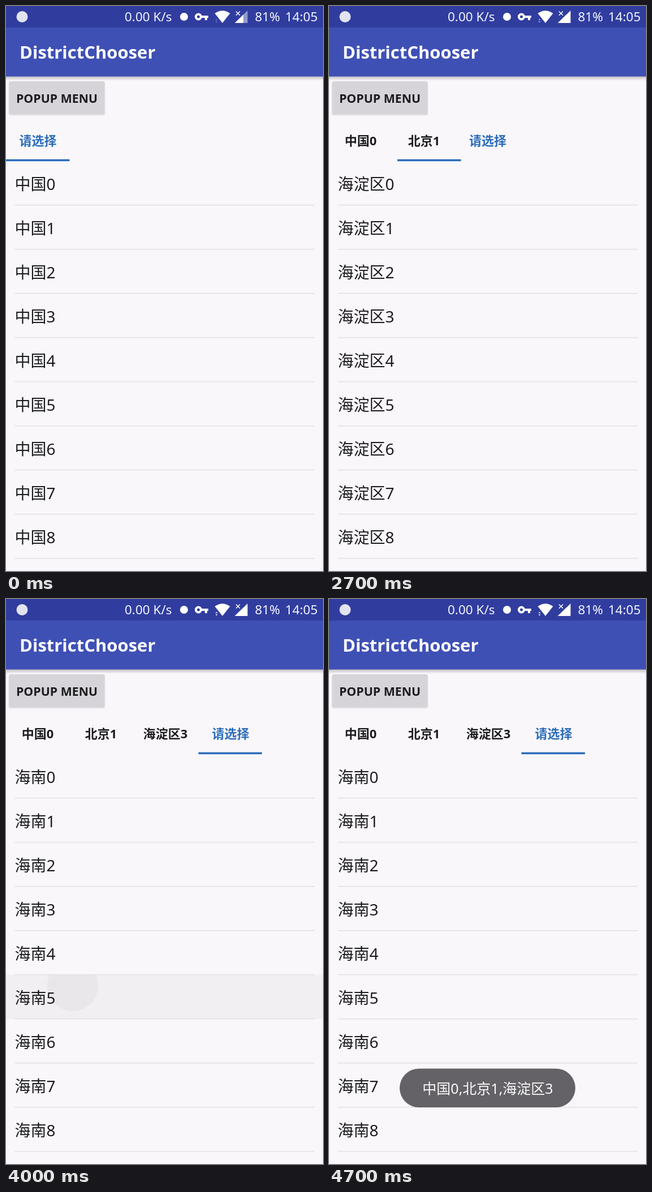
These frames come from a looping animation (561x998 px, 4800 ms). An HTML page with a canvas:

```html
<!DOCTYPE html>
<html lang="zh-CN">
<head>
<meta charset="utf-8">
<title>District picker</title>
<style>
html, body { margin: 0; width: 100%; height: 100%; overflow: hidden; background: #f9f7fa; }
canvas { display: block; }
</style>
</head>
<body>
<canvas id="screen" width="561" height="998"></canvas>
<script>
const ctx = document.getElementById('screen').getContext('2d');
const LOOP = 4800, STEP = 100, ROW = 78, LIST_TOP = 274;
const FONTS = '"Noto Sans", "Noto Sans CJK SC", "Noto Sans CJK", "Noto Sans CJK JP", sans-serif';
const PAPER = '#f9f7fa', BLUE = '#2b6cb9', INK = '#1c1b1e';

// Each level of the picker: when its list appears, when its tab slides in, and the tap on it
const levels = [
  { word: '中国', at: 0, left: 0, mid: 56, picked: 0, tap: { at: 2200, row: 0, x: 110 } },
  { word: '北京', at: 2300, slide: 2200, left: 112, mid: 168, picked: 1 },
  { word: '海淀区', at: 2700, slide: 2651, left: 224, mid: 282, picked: 3, tap: { at: 3100, row: 3, x: 118 } },
  { word: '海南', at: 3200, slide: 3132, left: 340.5, mid: 397, tap: { at: 4000, row: 5, x: 118 } }
];
const chosen = levels.slice(0, 3).map(l => l.word + l.picked);

const clamp = v => Math.max(0, Math.min(1, v));

// cubic-bezier(.4, 0, .2, 1)
function fastOutSlowIn(p) {
  let lo = 0, hi = 1;
  for (let i = 0; i < 20; i++) {
    const u = (lo + hi) / 2, v = 1 - u;
    if (1.2 * u * v * v + 0.6 * u * u * v + u ** 3 < p) lo = u; else hi = u;
  }
  return 3 * lo * lo * (1 - lo) + lo ** 3;
}

function rect(x, y, w, h, color) {
  ctx.fillStyle = color;
  ctx.fillRect(x, y, w, h);
}

function round(x, y, w, h, r, color) {
  ctx.fillStyle = color;
  ctx.beginPath();
  ctx.roundRect(x, y, w, h, r);
  ctx.fill();
}

function disc(x, y, r, color) {
  ctx.fillStyle = color;
  ctx.beginPath();
  ctx.arc(x, y, r, 0, 7);
  ctx.fill();
}

function shape(path, color) {
  ctx.fillStyle = color;
  ctx.fill(new Path2D(path));
}

function text(str, x, y, size, color, weight = 400, align = 'left') {
  ctx.font = `${weight} ${size}px ${FONTS}`;
  ctx.textAlign = align;
  ctx.fillStyle = color;
  ctx.fillText(str, x, y);
}

function drawStatusBar(t) {
  rect(0, 0, 561, 38, '#303d9f');
  disc(28.5, 19, 10, '#e2e4f1');
  text('0.00 K/s', 210, 27, 22.5, '#f4f5fb');
  disc(315, 19, 7, '#fff');

  ctx.lineWidth = 4;
  ctx.strokeStyle = '#fff';
  ctx.beginPath();
  ctx.arc(340.5, 19, 4.5, 0, 7);
  ctx.stroke();
  shape('M345 17H358V21H356V25H352V21H345Z', '#fff');

  shape('M369.5 13Q383 3.5 396.5 13L383 30Z', '#fff');
  const arrows = t < 2300 ? '#6b75bb' : t < 3900 ? '#a5acd8' : '#f0f1fa';
  shape('M370.5 25L372.5 22.5L374.5 25ZM370.5 27L372.5 29.5L374.5 27Z', arrows);

  shape('M405 30L427.5 8V30Z', t < 2300 ? '#929bce' : '#fff');
  shape('M405 30L420 15.3V30Z', '#fff');
  ctx.lineWidth = 1.5;
  ctx.stroke(new Path2D('M407 9.5L414 16.5M414 9.5L407 16.5'));

  text('81%', 440.5, 27, 22.5, '#f4f5fb');
  text('14:05', 494, 27, 22.5, '#f4f5fb');
}

function drawHeader() {
  const shade = ctx.createLinearGradient(0, 124, 0, 132);
  shade.addColorStop(0, 'rgba(0,0,0,.24)');
  shade.addColorStop(1, 'rgba(0,0,0,0)');
  rect(0, 124, 561, 8, shade);
  rect(0, 38, 561, 86.5, '#3f50b5');
  text('DistrictChooser', 24, 93, 31, '#fff', 600);

  round(4.5, 133.5, 171, 60, 4, '#e6e4e8');
  round(5.5, 133, 169, 58.5, 3, '#d6d4d8');
  text('POPUP MENU', 18, 170.5, 21.3, INK, 600);
}

function drawTabs(t, n) {
  for (let i = 0; i < n; i++) text(chosen[i], levels[i].mid, 246, 22, INK, 600, 'center');
  const { left, mid, slide } = levels[n];
  text('请选择', n === 2 ? 281 : mid + 0.5, 246, 22, BLUE, 600, 'center');
  const from = n ? levels[n - 1].left : 0;
  const x = n ? from + (left - from) * fastOutSlowIn(clamp((t - slide) / 300)) : 0;
  rect(x, 270.7, 112.5, 3.5, BLUE);
}

function drawRipple(t, tap) {
  const k = (t - tap.at) / STEP;
  if (k < 0 || k > 3) return;
  const top = LIST_TOP + tap.row * ROW;
  rect(0, top, 561, ROW, `rgba(0,0,0,${[0.03, 0.055, 0.045, 0.02][k]})`);
  ctx.save();
  ctx.beginPath();
  ctx.rect(0, top, 561, ROW);
  ctx.clip();
  disc(tap.x, top + 19, 45 + 80 * k, `rgba(0,0,20,${k < 2 ? 0.034 : 0.034 - 0.012 * (k - 1)})`);
  ctx.restore();
}

function drawList(t, { word, tap }) {
  if (tap) drawRipple(t, tap);
  for (let i = 0; i < 10; i++) {
    const y = LIST_TOP + i * ROW;
    text(word + i, 15.5, y + 50.5, 28, INK);
    rect(15.5, y + 76.8, 530.5, 1.7, '#e4e2e5');
  }
}

function drawToast(t) {
  const alpha = 1 - (1 - clamp((t - 4000) / 400)) ** 2.2;
  if (!alpha) return;
  round(125, 829.5, 311, 68.5, 34.25, `rgba(100,98,102,${alpha})`);
  text(chosen.join(), 281, 873.5, 25, '#fafafb', 300, 'center');
}

function draw(now) {
  const t = Math.floor((now % LOOP) / STEP) * STEP;
  const n = levels.filter(l => l.at <= t).length - 1;
  rect(0, 0, 561, 998, PAPER);
  drawHeader();
  drawStatusBar(t);
  drawTabs(t, n);
  drawList(t, levels[n]);
  drawToast(t);
}

const start = performance.now();
function tick() {
  draw(performance.now() - start);
  requestAnimationFrame(tick);
}
tick();
</script>
</body>
</html>
```
